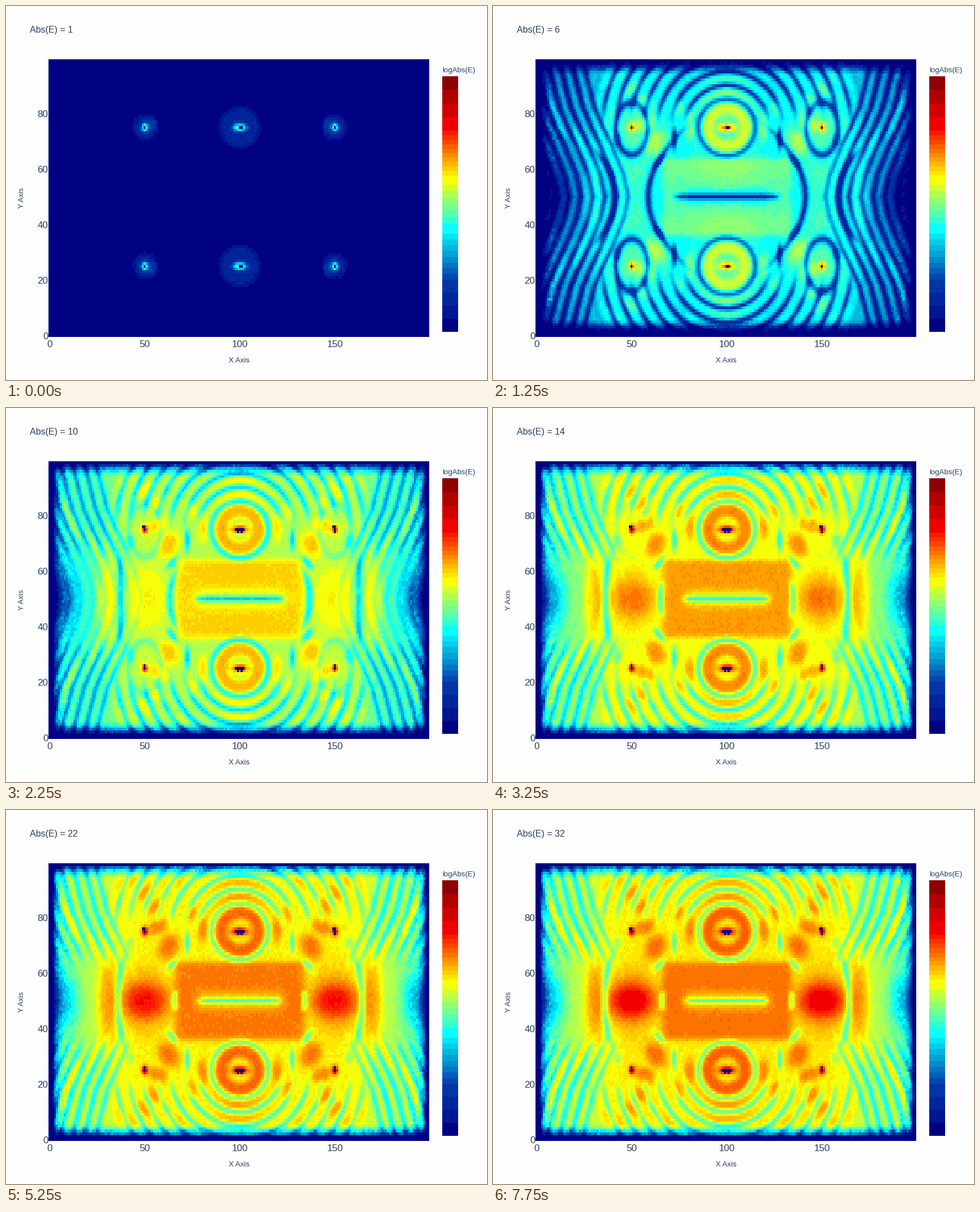
These frames come from a looping animation (849x660 px, 8 s). A matplotlib script:

```python
import numpy as np
import matplotlib.pyplot as plt
from matplotlib.animation import FuncAnimation
from matplotlib.colors import BoundaryNorm, LinearSegmentedColormap, ListedColormap

W, H, DPI = 849, 660, 64
FRAMES, INTERVAL = 32, 250
NX, NY = 200, 100
INK = "#2a3f5f"
plt.rcParams["font.family"] = "Liberation Sans"

# Evenly spaced jet, split into flat bands
JET = [(0, 0, 131), (0, 60, 170), (5, 255, 255),
       (255, 255, 0), (250, 0, 0), (128, 0, 0)]
smooth_jet = LinearSegmentedColormap.from_list(
    "smooth_jet", [tuple(c / 255 for c in rgb) for rgb in JET])
EDGES = np.concatenate([
    np.linspace(0, .203, 5)[:-1], np.linspace(.203, .384, 9)[:-1],
    np.linspace(.384, .424, 2)[:-1], np.linspace(.424, .574, 7)[:-1],
    np.linspace(.574, .612, 2)[:-1], np.linspace(.612, .787, 11)[:-1],
    np.linspace(.787, 1, 5)])
MIDS = (EDGES[1:] + EDGES[:-1]) / 2
colors = smooth_jet(MIDS)
colors[0] = smooth_jet(0.0)
CMAP = ListedColormap(colors)
NORM = BoundaryNorm(EDGES, len(MIDS), clip=True)

# Stage pixels of each cell, folded onto the upper left quarter
I, J = np.meshgrid(np.arange(NX), np.arange(NY))
X = 413 - 3.36 * np.abs(I - 100)
Y = 337.25 - 4.895 * np.abs(J - 50)
DY = 337.25 - Y

MAIN = (413, 214.9)
SIDE = (245, 214.9)
R = np.hypot(X - MAIN[0], Y - MAIN[1])
RS = np.hypot(X - SIDE[0], Y - SIDE[1])
NEAR = np.minimum(R, RS)
NOISE = np.random.default_rng(4).normal(0, 1, (NY, NX))


def sig(z):
    return 1 / (1 + np.exp(-np.clip(z, -50, 50)))


def bump(d, width):
    return np.exp(-(d / width) ** 2)


def wrap(d, period):
    return (d + period / 2) % period - period / 2


def blob(cx, cy, rx, ry, tilt, amp):
    """Flat-topped ellipse; a positive tilt leans it like a slash."""
    a = np.radians(tilt)
    dx, dy = X - cx, Y - cy
    u = dx * np.cos(a) - dy * np.sin(a)
    v = dx * np.sin(a) + dy * np.cos(a)
    q = (u / rx) ** 2 + (v / ry) ** 2
    return amp * np.exp(-q ** 1.5)


BLOBS = [
    (347, 212, 9, 24, 0, .08), (325, 181, 10, 15, -15, .08),
    (287, 242, 18, 24, -30, .10), (268, 207, 19, 13, 30, .09),
    (265, 170, 20, 10, 40, .08), (248, 145, 24, 9, 35, .07),
    (213, 130, 24, 9, 30, .04), (100, 170, 9, 25, 12, .06),
    (120, 208, 9, 26, 18, .07), (152, 242, 10, 28, 20, .07),
    (178, 337, 17, 85, 0, .10), (245, 337, 40, 62, 0, .06),
    (300, 128, 20, 8, 30, .04),
]


def settled_field():
    """Everything that only grows in strength, without the dark lines."""
    z = .615 - .06 * sig((185 - X) / 8)
    z += sum(blob(*b) for b in BLOBS)
    z += .11 * np.exp(-(np.abs(R - 33) / 12) ** 3)
    above = sig((200 - Y) / 6) * bump(X - 413, 48)
    z += above * (.07 * bump(R - 61, 9) + .05 * bump(R - 86, 8))
    slab = sig((X - 299) / 4) * sig((Y - 269) / 3) * sig((R - 54) / 2)
    z += .095 * slab
    z -= .08 * sig((X - 340) / 5) * bump(DY, 15)
    z -= .23 * bump(DY, 62) * sig((122 - X) / 9)
    z -= np.interp(Y, [97, 102, 107, 113, 120], [.62, .32, .2, .09, 0])
    z -= np.interp(X, [77, 80.4, 83.7, 87, 92, 100, 110],
                   [.62, .55, .42, .24, .12, .03, 0])
    # Bright rims around the emitters
    z += .27 * np.exp(-((X - 413) / 14) ** 2 - ((Y - MAIN[1]) / 7) ** 2)
    z += .27 * np.exp(-((X - 245) / 5) ** 2 - ((Y - SIDE[1]) / 8) ** 2)
    edge = sig((115 - X) / 8) + sig((112 - Y) / 4)
    return z + NOISE * (.004 + .02 * edge)


def fixed_lines():
    """Dark rings and stripes that hold their place."""
    ring = bump(R - 50, 5) * .8
    clear = 1 - bump(RS, 34)
    zone = sig((232 - R) / 6) * sig((192 - Y) / 9) * sig((R - 60) / 3)
    ring += zone * clear * bump(wrap(R - 50, 24.2), 5)
    # Short pieces at the corner of the warm slab and beside it
    ring += blob(294, 274, 14, 6, 50, .9) + blob(320, 234, 5, 20, 0, 1)
    ring += .5 * blob(220, 236, 8, 12, 0, 1)
    return ring


BASE = settled_field()
LINES = fixed_lines()
LEAN = np.interp(Y, [95, 110, 180, 215, 250, 300, 340], [-3, 0, 18, 33, 50, 70, 78])
U = X - LEAN
STRIPES = bump(wrap(U - 141, 21), 5.2) * sig((168 - U) / 4)


def field(n):
    early = np.exp(-max(n - 6, 0) / 4)
    depth = .15 * (1 + .6 * early)

    z = BASE - .14 * np.exp(-(n - 6) / 5)
    z = z - .0008 * np.exp(-(n - 6) / 2.2) * NEAR
    glow = .16 * (1 - np.exp(-max(n - 9, 0) / 9))
    q = ((X - 245) / 46) ** 2 + (DY / 32) ** 2
    z += glow * np.exp(-q ** 1.3)

    lines = LINES + STRIPES * np.maximum(sig((262 - Y) / 9), .8 * early)
    # Waists left and right of the hot spots
    left = X - (197 + 18 * early) - (.002 - .007 * early) * DY ** 2
    lines += bump(left, 6) * sig((75 - DY) / 6)
    right = X - (299 - 25 * early) - .0045 * DY ** 2
    lines += bump(right, 6) * np.exp(-(DY / (15 + 105 * early)) ** 4)
    # Oval around the side emitters, soon washed out
    oval = np.hypot((X - 245) / 28, (Y - 217) / 46)
    lines += early * bump(oval - 1, .17)
    # Middle bar
    lines += 1.05 * sig((X - 343 + 20 * early) / 3) * bump(DY, 5)
    z -= depth * np.minimum(lines, 1.15)
    return carve(z, n)


def carve(z, n):
    """Empty cells at the emitters, wider once the field is strong."""
    wide = n >= 8
    for row in (75, 25):
        reach = 3 if wide else 1
        z[row, 101 - reach:100 + reach + (not wide)] = 0
        if wide:
            z[row - 1, [99, 101]] = 0
        for col in (50, 150):
            z[row, col] = 0
            if wide and row == 75:
                z[76, col - 1:col + 1] = 0
            elif wide:
                z[26, col] = 0
    if wide:
        z[74, 150] = 0
    return z


fig = plt.figure(figsize=(W / DPI, H / DPI), dpi=DPI, facecolor="#fefefe")
ax = fig.add_axes([0, 0, 1, 1])
image = ax.imshow(field(1), cmap=CMAP, norm=NORM, origin="lower",
                  interpolation="nearest", aspect="auto",
                  extent=(75.4, 747, 584.4, 95))
ax.pcolormesh([770, 798], 575 - 451 * EDGES, MIDS[:, None],
              cmap=CMAP, norm=NORM)
ax.set_xlim(0, W)
ax.set_ylim(H, 0)
ax.axis("off")


def label(x, y, text, px, **kw):
    return ax.text(x, y, text, fontsize=px * 72 / DPI, color=INK, **kw)


title = label(42.5, 47.5, "", 16)
label(770, 117, "logAbs(E)", 13.2)
label(411.5, 629, "X Axis", 13.2, ha="center")
label(28.5, 339, "Y Axis", 13.2, ha="center", va="center", rotation=90)
for v in range(0, 200, 50):
    label(77 + 3.36 * v, 602.5, str(v), 17, ha="center")
for v in range(0, 100, 20):
    label(74.5, 588 - 4.895 * v, str(v), 17, ha="right")


def update(k):
    image.set_data(field(k + 1))
    title.set_text(f"Abs(E) = {k + 1}")
    return image, title


anim = FuncAnimation(fig, update, frames=FRAMES, interval=INTERVAL,
                     repeat=True, repeat_delay=0, blit=False)
plt.show()
```
